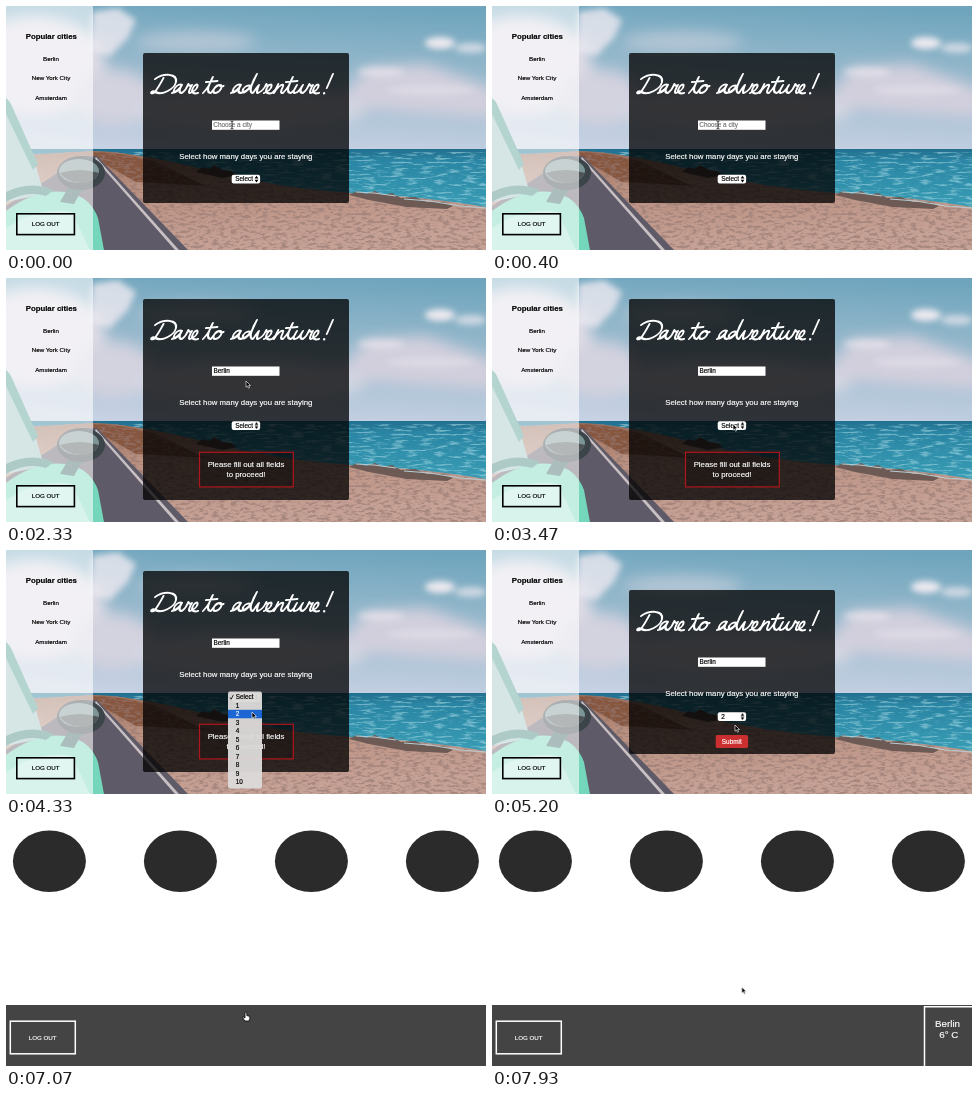
Animation of 480x244 px, one loop 8000 ms. Source, as an HTML page:

```html
<!DOCTYPE html>
<html lang="en">
<head>
<meta charset="utf-8">
<title>Trip planner</title>
<style>
html, body { margin: 0; width: 100%; height: 100%; overflow: hidden; background: #fff; }
svg { display: block; width: 480px; height: 244px; color: #000; }
text {
  font: 6.2px "Liberation Sans", Arial, sans-serif;
  fill: currentColor; stroke: currentColor; stroke-width: .18px;
}
.mid { text-anchor: middle; }
.white { color: #fff; }
.red { color: #cb2f2f; }
.grey { color: #757575; }
.body { font-size: 7.8px; }
.bold { font-weight: bold; }
.field { font-size: 6.4px; }
.temp { font-size: 9.8px; }
.url { font-size: 5.4px; color: #444; }

.step { animation: 8s step-end infinite; }
.card { animation-name: card; }
.panel { animation-name: panel; }
.days { animation-name: days; }
.hint { animation-name: hint; }
.list { animation-name: list; }
.chosen { animation-name: chosen; }
.error { animation-name: error; }
.menu { animation-name: menu; }
.pick { animation-name: pick; }
.before { animation-name: before; }
.after { animation-name: after; }
.idle { animation-name: idle; }
.hover { animation-name: hover; }
.status { animation: status 8s linear infinite; }
.next { animation-name: next; }
.weather { animation-name: weather; }
.arrow { animation-name: arrow; }
.hand { animation-name: hand; }
.pointer { animation: pointer 8s linear infinite; }

@keyframes card {
  0% { transform: translateY(47px) }
  7.5% { transform: translateY(20px) }
  25% { transform: translateY(21px) }
  58.75%, 100% { transform: translateY(40px) }
}
@keyframes panel {
  0% { height: 150px }
  7.5% { height: 204px }
  25% { height: 201px }
  58.75%, 100% { height: 164px }
}
@keyframes days {
  0% { transform: translateY(0) }
  7.5% { transform: translateY(53px) }
  25%, 100% { transform: translateY(.5px) }
}
@keyframes hint { 0% { opacity: 1 } 7.5%, 100% { opacity: 0 } }
@keyframes list { 0% { opacity: 0 } 7.5% { opacity: 1 } 25%, 100% { opacity: 0 } }
@keyframes chosen { 0% { opacity: 0 } 25%, 100% { opacity: 1 } }
@keyframes error { 0% { opacity: 0 } 25% { opacity: 1 } 58.75%, 100% { opacity: 0 } }
@keyframes menu { 0% { opacity: 0 } 47.5% { opacity: 1 } 58.75%, 100% { opacity: 0 } }
@keyframes pick { 0% { opacity: 0 } 51.7%, 100% { opacity: 1 } }
@keyframes before { 0% { opacity: 1 } 58.75%, 100% { opacity: 0 } }
@keyframes after { 0% { opacity: 0 } 58.75%, 100% { opacity: 1 } }
@keyframes idle { 0% { opacity: 1 } 74.1%, 100% { opacity: 0 } }
@keyframes hover { 0% { opacity: 0 } 74.1%, 100% { opacity: 1 } }
@keyframes status { 0%, 75.5% { opacity: 0 } 77%, 100% { opacity: 1 } }
@keyframes next { 0% { opacity: 0 } 88.35%, 100% { opacity: 1 } }
@keyframes weather { 0% { opacity: 0 } 90%, 100% { opacity: 1 } }
@keyframes arrow {
  0% { opacity: 0 } 7.5% { opacity: 1 } 74.1% { opacity: 0 } 96.6%, 100% { opacity: 1 }
}
@keyframes hand { 0% { opacity: 0 } 74.1% { opacity: 1 } 96.6%, 100% { opacity: 0 } }
@keyframes pointer {
  0%, 7.5% { transform: translate(226px, 119px) }
  12.5%, 16% { transform: translate(233.5px, 97px) }
  24%, 33.4% { transform: translate(240px, 103px) }
  43.4%, 47.5% { transform: translate(241px, 146px) }
  53%, 58.75% { transform: translate(246px, 162px) }
  64%, 66% { transform: translate(243px, 175px) }
  70% { transform: translate(262px, 196px) }
  73.4% { transform: translate(255px, 215px) }
  74.1%, 96.3% { transform: translate(240px, 191px) }
  99.1%, 100% { transform: translate(249.7px, 165px) }
}
</style>
</head>
<body>
<svg viewBox="0 0 480 244">
  <defs>
    <linearGradient id="sky" x1=".75" x2=".6" y2="1">
      <stop offset="0" stop-color="#6ea5bd"/>
      <stop offset=".45" stop-color="#98b9cc"/>
      <stop offset="1" stop-color="#c6d1e3"/>
    </linearGradient>
    <linearGradient id="sea" x2="0" y2="1">
      <stop offset="0" stop-color="#226f8e"/>
      <stop offset=".2" stop-color="#2a86a4"/>
      <stop offset="1" stop-color="#3a9db5"/>
    </linearGradient>
    <linearGradient id="sand" x2=".3" y2="1">
      <stop offset="0" stop-color="#96664f"/>
      <stop offset=".4" stop-color="#b98f7f"/>
      <stop offset="1" stop-color="#c6a195"/>
    </linearGradient>
    <filter id="soft" x="-40%" y="-60%" width="180%" height="220%"><feGaussianBlur stdDeviation="7"/></filter>
    <filter id="wisp" x="-40%" y="-60%" width="180%" height="220%"><feGaussianBlur stdDeviation="3"/></filter>
    <filter id="grain" x="0" y="0" width="100%" height="100%">
      <feTurbulence type="fractalNoise" baseFrequency=".16 .4" numOctaves="4" seed="4"/>
      <feColorMatrix values="0 0 0 0 .3  0 0 0 0 .19  0 0 0 0 .17  0 5 0 0 -2.3"/>
      <feComposite in2="SourceGraphic" operator="in"/>
    </filter>
    <filter id="ripple" x="0" y="0" width="100%" height="100%">
      <feTurbulence type="fractalNoise" baseFrequency=".07 .5" numOctaves="3" seed="9"/>
      <feColorMatrix values="0 0 0 0 .5  0 0 0 0 .8  0 0 0 0 .86  0 4 0 0 -2"/>
    </filter>
    <path id="beach" d="M0 150L88 145Q130 146 200 164T345 187Q420 191 480 201V244H0Z"/>
  </defs>

  <!-- coast -->
  <rect width="480" height="146" fill="url(#sky)"/>
  <g filter="url(#soft)" fill="#dfdce6">
    <ellipse cx="30" cy="60" rx="70" ry="50"/>
    <ellipse cx="108" cy="92" rx="40" ry="28" fill="#d3d2df"/>
    <path d="M330 100L360 62 420 58 490 84V112L400 106Z" fill="#d2cfdd"/>
    <ellipse cx="240" cy="104" rx="120" ry="22" fill="#d3d5e1"/>
    <ellipse cx="190" cy="36" rx="60" ry="10" fill="#b4c6d5"/>
  </g>
  <g filter="url(#wisp)" fill="#eeeaf0">
    <path d="M86 6L112 2 130 14 122 32 104 50 84 46Z" opacity=".8"/>
    <ellipse cx="434" cy="37" rx="15" ry="6"/>
    <ellipse cx="465" cy="42" rx="16" ry="5" opacity=".7"/>
    <ellipse cx="375" cy="66" rx="24" ry="5" opacity=".6"/>
    <ellipse cx="425" cy="84" rx="45" ry="5" opacity=".4"/>
  </g>
  <rect y="143" width="480" height="60" fill="url(#sea)"/>
  <rect y="146" width="480" height="57" filter="url(#ripple)" opacity=".5"/>
  <use href="#beach" fill="url(#sand)"/>
  <path d="M88 146Q120 147 150 156L200 180 130 176 88 152Z" fill="#86563f"/>
  <use href="#beach" filter="url(#grain)" opacity=".6"/>
  <path d="M190 166l6-5 7 2 5-4 9 5 8 1 6 4-14 3Z" fill="#4f4540"/>
  <path d="M343 189l8-4 9 3 9-3 8 4 9-2 9 5 14-1 12 5 16 0 10 4-6 3-40-2-38-7Z" fill="#6d5a54"/>
  <path d="M350 186l18 1 22 3M398 193l26 2 30 5 26 2" fill="none" stroke="#b7cbd0" stroke-width="1.2"/>
  <path d="M78 150H91L182 244H0V200Z" fill="#5f5a67"/>
  <path d="M90 151L173 244H169L89 153Z" fill="#c9c0c4"/>

  <!-- car -->
  <path d="M0 92L30 160 38 188 0 196Z" fill="#9cc3c2"/>
  <path d="M0 92L4 96 32 158 27 164 0 108Z" fill="#4c9a8e"/>
  <path d="M0 205Q30 182 60 186 84 190 92 212L98 244H0Z" fill="#74d6bb"/>
  <path d="M0 222Q34 200 66 206L84 244H0Z" fill="#9fe3cf"/>
  <path d="M0 186Q24 174 48 184L40 190Q20 184 0 196Z" fill="#3f8078"/>
  <path d="M62 182L78 180 68 198 54 196Z" fill="#37625f"/>
  <ellipse cx="75" cy="167" rx="24" ry="17" fill="#3a4449"/>
  <ellipse cx="73" cy="165" rx="20" ry="12" fill="#7d9596"/>
  <path d="M54 167Q74 161 93 167 88 177 74 177 60 176 54 167Z" fill="#4d5357"/>

  <!-- side bar -->
  <rect width="87" height="244" fill="#fff" opacity=".58"/>
  <text class="mid body bold" x="45.3" y="33">Popular cities</text>
  <text class="mid" x="45" y="55">Berlin</text>
  <text class="mid" x="45" y="74.4">New York City</text>
  <text class="mid" x="45" y="93.8">Amsterdam</text>
  <rect x="10.8" y="207.8" width="57.6" height="20.8" fill="#fff" fill-opacity=".25" stroke="#000" stroke-width="1.6"/>
  <text class="mid" x="39.7" y="220.3">LOG OUT</text>

  <!-- planner -->
  <g class="step card">
    <rect class="step panel" x="137" width="206" height="150" rx="2" fill="#000" fill-opacity=".76"/>
    <path id="title" role="img" aria-label="Dare to adventure!" transform="translate(0 40) skewX(-20)"
      fill="none" stroke="#fff" stroke-width="2" stroke-linecap="round" stroke-linejoin="round"/>
    <rect x="206" y="67.5" width="67.5" height="9.3" fill="#fff"/>
    <text class="field grey step hint" x="207.3" y="74.4">Choose a city</text>
    <g class="step list">
      <text class="field" x="207.5" y="74.4">b</text>
      <g id="cities" class="white"></g>
    </g>
    <text class="field step chosen" x="207.5" y="74.4">Berlin</text>

    <g class="step days">
      <text class="mid body white" x="239.8" y="105.8">Select how many days you are staying</text>
      <rect x="225.7" y="121.7" width="28.4" height="8.8" rx="2" fill="#fff"/>
      <text class="field step before" x="229.2" y="128.4">Select</text>
      <text class="field step after" x="229.2" y="128.4">2</text>
      <path d="M248.6 125.4l1.9-2.6 1.9 2.6zM248.6 126.8l1.9 2.6 1.9-2.6z"/>
    </g>

    <g class="step error">
      <rect x="193.5" y="153.3" width="93.8" height="34.6" fill="#000" fill-opacity=".2" stroke="#b0141c" stroke-width="1.2"/>
      <text class="mid body white" x="240" y="168.4">Please fill out all fields</text>
      <text class="mid body white" x="240" y="177.9">to proceed!</text>
    </g>

    <g class="step after">
      <g class="step idle">
        <rect x="223.7" y="145" width="32.4" height="13" rx="1.8" fill="#cb2f2f"/>
        <text class="mid field white" x="239.8" y="153.8">Submit</text>
      </g>
      <g class="step hover">
        <rect x="223.7" y="145" width="32.4" height="13" rx="1.8" fill="#fff"/>
        <text class="mid field red" x="239.8" y="153.8">Submit</text>
      </g>
    </g>
  </g>

  <g class="step menu">
    <rect x="222" y="141.5" width="34" height="97" rx="2" fill="#dcdad9" fill-opacity=".96"/>
    <path d="M224 147.4l1.2 1.8 2.2-4.4" fill="none" stroke="#000" stroke-width=".8"/>
    <g id="options"></g>
    <g class="step pick">
      <rect x="222" y="159.8" width="34" height="8.5" fill="#1b66d2"/>
      <text class="field white" x="229.7" y="166.3">2</text>
    </g>
  </g>

  <g class="status">
    <path d="M0 237H156.5Q158.5 237 158.5 239V244H0Z" fill="#e2e2e2"/>
    <text class="url" x="-1.3" y="242.5">localhost:8080/working-area</text>
  </g>

  <!-- working area -->
  <g class="step next">
    <rect width="480" height="244" fill="#fff"/>
    <g id="discs" fill="#2b2b2b"></g>
    <rect y="183" width="480" height="61" fill="#444"/>
    <rect x="4.3" y="199.2" width="65" height="32.6" fill="none" stroke="#fff" stroke-width="1.5"/>
    <text class="mid white" x="36.7" y="218.3">LOG OUT</text>
    <g class="step weather">
      <path d="M432.5 244V184.7H480" fill="none" stroke="#fff" stroke-width="1.5"/>
      <text class="mid temp white" x="455.5" y="204.7">Berlin</text>
      <text class="mid temp white" x="456.8" y="216">6° C</text>
    </g>
  </g>

  <g class="pointer">
    <path class="step hint" d="M-1.5-4Q0-4 0-3 0-4 1.5-4M0-3V3M-1.5 4Q0 4 0 3 0 4 1.5 4" fill="none" stroke="#222" stroke-width=".9"/>
    <path class="step arrow" d="M0 0V6.2L1.5 4.9 2.5 7.2 3.6 6.7 2.6 4.5H4.5Z" stroke="#fff" stroke-width=".6"/>
    <path class="step hand" d="M-1-.5Q0-1.5 .8-.5V2.5L3.8 3.4Q4.3 5.5 3 8H-1.2L-3.6 4.3Q-3.3 3.2-1 5Z" fill="#fff" stroke="#000" stroke-width=".8"/>
  </g>
</svg>
<script>
const fill = (id, items, draw) => {
  document.getElementById(id).innerHTML = items.map(draw).join('');
};

fill('cities', ['Berlin', 'Barcelona', 'Budapest', 'Brussels'], (name, i) =>
  `<text class="mid" x="240" y="${86.2 + i * 13.1}">${name}</text>`);
fill('options', ['Select', 1, 2, 3, 4, 5, 6, 7, 8, 9, 10], (name, i) =>
  `<text class="field" x="229.7" y="${149.3 + i * 8.5}">${name}</text>`);
fill('discs', [0, 1, 2, 3], (_, i) =>
  `<ellipse cx="${43.4 + i * 131}" cy="39.3" rx="36.5" ry="30.8"/>`);

// Handwritten letters as pen strokes from the baseline: [path, advance]
const pen = {
  D: ['m5,-15c-1,6 -2,11 -4,15c-5,1 -3,-3 1,-1c8,4 18,-3 17,-10c-2,-9 -16,-9 -22,-3', 19],
  a: ['c3,-1 6,-4 7,-8c-4,-2 -7,3 -6,6c1,4 6,-1 6,-6c-1,4 -1,8 3,8', 10],
  r: ['c2,-2 3,-5 3,-9c1,2 3,2 4,1c-1,4 -1,8 1,8', 8],
  e: ['c3,-1 6,-4 5,-7c-1,-3 -4,-1 -4,3c0,4 4,5 7,4', 8],
  t: ['c2,-3 4,-9 4,-16c-1,7 -2,16 4,16m-9,-11l11,-1', 8],
  o: ['c1,-5 4,-8 6,-8c-5,-1 -6,8 -2,8c5,0 6,-8 2,-8c1,2 2,2 4,1', 10],
  d: ['c3,-1 6,-4 7,-7c-4,-2 -7,2 -6,5c1,4 6,0 7,-7l1,-10c-2,8 -2,19 3,19', 12],
  v: ['c1,-3 2,-7 3,-8c0,4 0,8 2,8c3,-1 5,-5 5,-9c1,2 2,2 3,1', 11],
  n: ['c2,-2 3,-5 3,-9c0,3 -1,6 -1,9c1,-5 4,-9 6,-8c2,1 -2,8 3,8', 11],
  u: ['c2,-2 3,-5 3,-8c-1,4 -2,8 1,8c3,0 4,-4 5,-8c-1,4 -1,8 3,8', 12],
  '!': ['m0,-5l1,-14m-2,19l.5,.5', 4]
};
const write = (word, x) => [...word].map(c => {
  const stroke = `M${x},0${pen[c][0]}`;
  x += pen[c][1];
  return stroke;
}).join('');
document.getElementById('title').setAttribute('d',
  write('Dare', 147) + write('to', 197) + write('adventure', 225) + write('!', 319));
</script>
</body>
</html>
```
